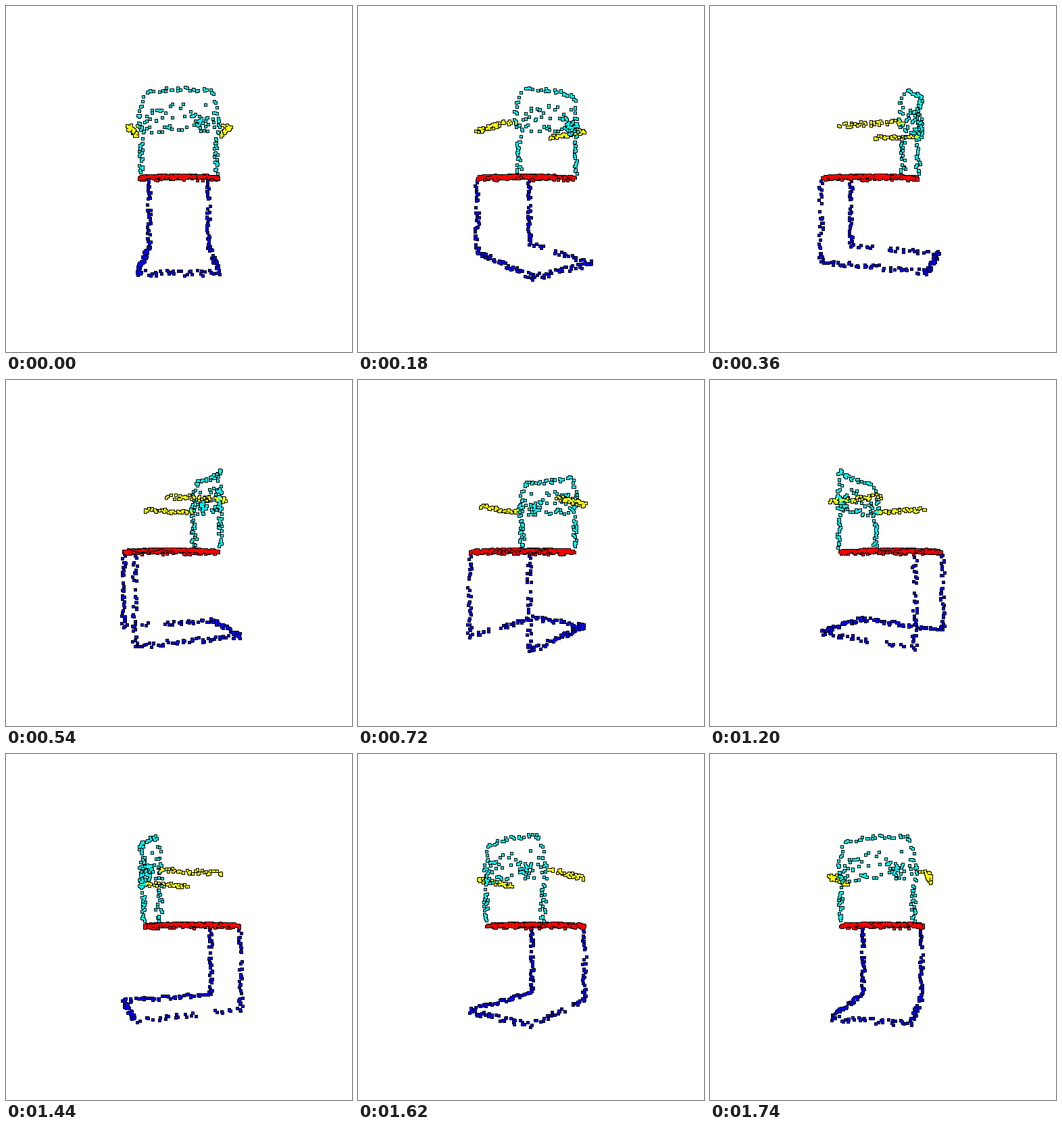
A matplotlib script that plays this animation: 512x512 px, repeating every 1800 ms.

```python
import numpy as np
import matplotlib.pyplot as plt
from matplotlib.animation import FuncAnimation

SIZE, DPI, FRAMES, STEP_MS = 512, 64, 30, 60
CX, CY, DIST = 256, 253, 450      # screen centre, eye level, camera distance
SLAB = 60                         # depth range that shares one outline
CORE, DISC = 2.6, 4.4             # diameters in pixels
BLUE, RED, CYAN, YELLOW = (0, 0, 1), (1, 0, 0), (0, 1, 1), (1, 1, 0)

rng = np.random.default_rng(7)


def along(n, gap=(1, 1)):
    """n jittered positions in 0..1 that skip one gap."""
    hole = gap[1] - gap[0]
    t = (np.arange(n) + rng.uniform(-.7, 1.7, n)).clip(0, n) / n * (1 - hole)
    return np.where(t > gap[0], t + hole, t)


def tube(p, q, n, gap=(1, 1), r=3.2):
    """Points on the skin of a thin bar from p to q."""
    p, q = np.array(p), np.array(q)
    skin = rng.normal(size=(n, 3))
    skin *= r / np.linalg.norm(skin, axis=1, keepdims=True)
    return p + along(n, gap)[:, None] * (q - p) + skin


def bow(x):
    """Depth of the curved backrest."""
    return 40 + 15 * (1 - (x / 55) ** 2)


def base():
    w, front, rear, floor = 51, -74, 75, -119
    parts = [tube((-w, floor, rear), (w, floor, rear), 36)]
    for s, n, gap in ((-1, 48, (1, 1)), (1, 28, (.28, .43))):
        knee = (s * w, floor, front)
        parts.append(tube((s * w, -6, front), knee, 34, (.27, .38)))
        parts.append(tube(knee, (s * w, floor, rear), n, gap))
    return np.vstack(parts)


def seat():
    def plate(u, v, y):
        # square with softened corners
        k = 1 - .08 * (u * v) ** 4
        return np.column_stack([56 * u * k, y, -16 + 61 * v * k])

    n, m = 420, 90
    u, v = rng.uniform(-1, 1, (2, n))
    edge = np.maximum(abs(u), abs(v))
    top = plate(u, v, 2.5 - 3 * edge ** 8 - rng.uniform(0, 3, n))
    a = 2 * np.pi * along(m)
    c, s = np.cos(a), np.sin(a)
    k = np.maximum(abs(c), abs(s))
    rim = plate(c / k, s / k, rng.uniform(-5, 0, m))
    return np.vstack([top, rim])


def backrest():
    def patch(n, x0, x1, y0, y1):
        return rng.uniform((x0, y0), (x1, y1), (n, 2))

    rail = np.column_stack([92 * along(26) - 46, rng.uniform(111, 116, 26)])
    parts = [rail, patch(72, -54, 54, 58, 88), patch(5, -12, 36, 89, 97)]
    for s in (-1, 1):
        y = 3 + 48 * along(20)
        parts.append(np.column_stack([s * (50 + rng.uniform(-3, 3, 20)), y]))
        y = 60 + 52 * along(10)
        x = 55 - .32 * np.maximum(y - 85, 0) + rng.uniform(-3, 1, 10)
        parts.append(np.column_stack([s * x, y]))
    x, y = np.vstack(parts).T
    return np.column_stack([x, y, bow(x) + rng.uniform(-3, 3, len(x))])


def arms():
    parts = []
    for s in (-1, 1):
        parts.append(tube((s * 68, 67, -38), (s * 68, 67, 40), 34))
        parts.append(tube((s * 68, 68, 42), (s * 58, 67, 44), 5))
    return np.vstack(parts)


groups = [(base(), BLUE), (seat(), RED), (backrest(), CYAN), (arms(), YELLOW)]
points = np.vstack([p for p, _ in groups])
colors = np.vstack([np.tile(c, (len(p), 1)) for p, c in groups])
count = len(points)

# every point is a black disc with a smaller coloured disc over it
is_core = np.repeat([0, 1], count)
faces = np.vstack([np.zeros((count, 3)), colors])
areas = (np.where(is_core, CORE, DISC) * 72 / DPI) ** 2

fig = plt.figure(figsize=(SIZE / DPI, SIZE / DPI), dpi=DPI, facecolor="white")
ax = fig.add_axes([0, 0, 1, 1])
ax.set(xlim=(0, SIZE), ylim=(SIZE, 0))
ax.axis("off")
dots = ax.scatter(np.zeros(2 * count), np.zeros(2 * count), s=areas, c=faces,
                  linewidths=0, antialiased=False)


def draw(i):
    angle = 2 * np.pi * i / FRAMES
    c, s = np.cos(angle), np.sin(angle)
    x, y, z = points.T
    depth = z * c - x * s
    scale = DIST / (DIST - depth)
    px = np.floor(CX + (x * c + z * s) * scale) + .5
    py = np.floor(CY - y * scale) + .5
    slab = np.tile(np.floor(depth / SLAB), 2)
    order = np.lexsort((np.tile(depth, 2), is_core, slab))
    dots.set_offsets(np.tile(np.column_stack([px, py]), (2, 1))[order])
    dots.set_facecolors(faces[order])
    dots.set_sizes(areas[order], DPI)
    return dots,


anim = FuncAnimation(fig, draw, frames=FRAMES, interval=STEP_MS,
                     init_func=lambda: draw(0), repeat=True, repeat_delay=0)
plt.show()
```
